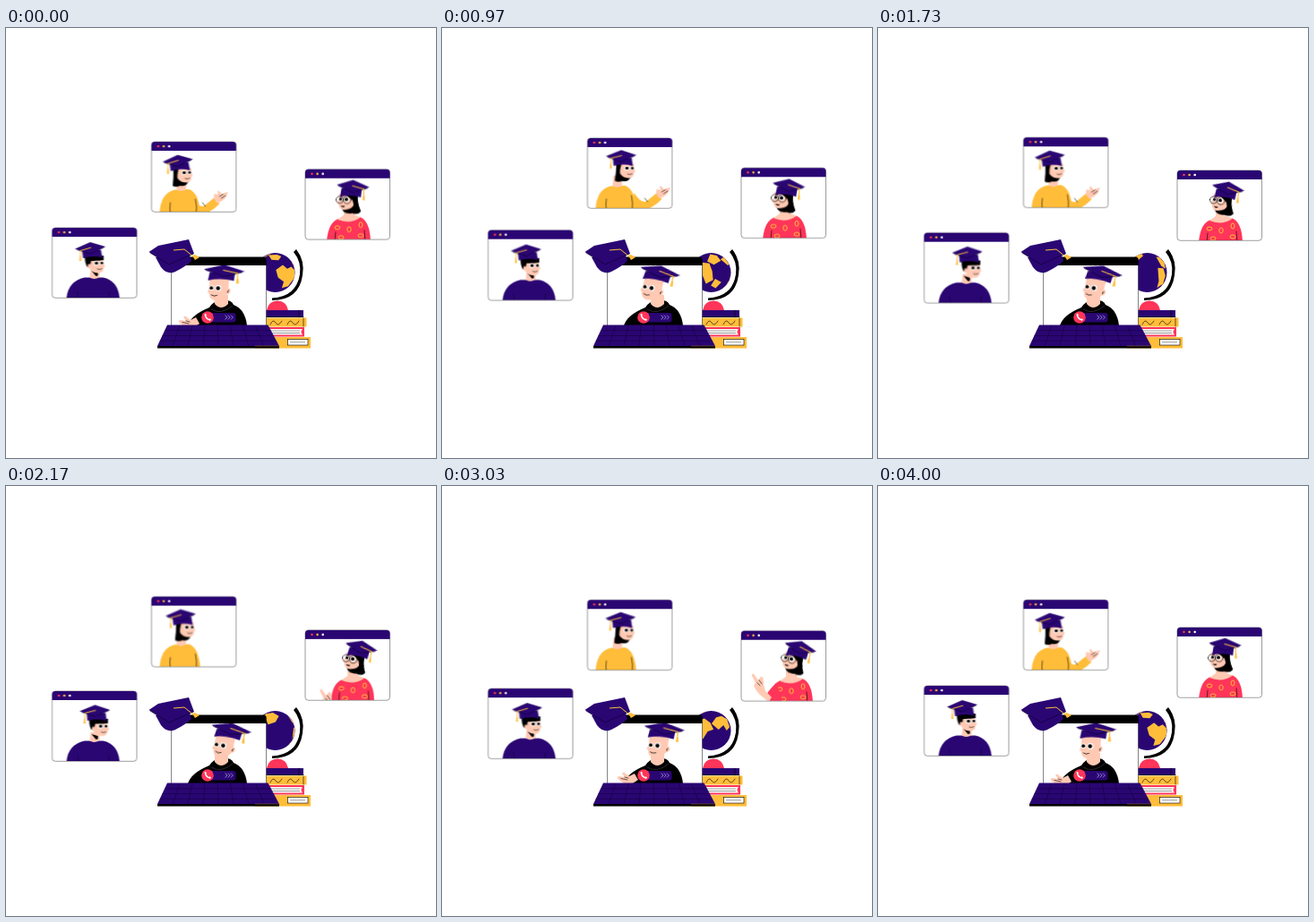
Recreate the animation shown at these times as an HTML page. Size 480 px wide and 480 px high, loop 4.03 s.

```html
<!DOCTYPE html>
<html lang="en">
<head>
<meta charset="utf-8">
<title>Online graduation</title>
<style>
html, body { margin: 0; width: 100%; height: 100%; overflow: hidden; background: #fff; }
svg { display: block; width: 100vw; height: 100vh; }
.navy { fill: #2a0673; }
.gold { fill: #ffbd3a; }
.red { fill: #ff3559; }
.skin { fill: #ffc9b3; }
.white { fill: #fff; }
.line { fill: none; stroke: #000; stroke-width: .6; stroke-linecap: round; stroke-linejoin: round; }
.edge { fill: none; stroke: #000; stroke-width: .4; }
.trim { fill: none; stroke: #ffbd3a; stroke-width: 1; stroke-linejoin: round; }

.bob { animation: bob 2.015s cubic-bezier(.37, 0, .63, 1) infinite alternate; }
.b1 { animation-delay: -2.545s; }
.b2 { animation-delay: -3.995s; }
.b3 { animation-delay: -3.295s; }
@keyframes bob { from { transform: translateY(-3px); } to { transform: translateY(3px); } }

.move { animation: 4.03s ease-in-out infinite; }
.h1 { animation-name: headTop; }
.h2 { animation-name: headLeft; }
.h3 { animation-name: headRight; }
.h4 { animation-name: headMain; }
.a1 { animation-name: armTop; }
.a3 { animation-name: armRight; }
.a4 { animation-name: armMain; }
.t3 { animation-name: torsoRight; }
.open { animation-name: eyesOpen; animation-timing-function: step-end; }
.shut { animation-name: eyesShut; animation-timing-function: step-end; }

@keyframes headTop {
  0%, 100%, 42%, 46% { transform: translate(0, 0) rotate(-1deg); }
  13%, 25%, 64%, 71% { transform: translate(7.5px, -1px) rotate(2deg); }
  84% { transform: translate(4.5px, 0) rotate(1deg); }
}
@keyframes headLeft {
  0%, 100% { transform: translate(0, 0); }
  14%, 24% { transform: translate(-.5px, 0) rotate(1deg); }
  43%, 50% { transform: translate(5px, -.5px) rotate(2deg); }
  65% { transform: translate(2.5px, 0) rotate(1deg); }
  84% { transform: translate(-.5px, 0); }
}
@keyframes headRight {
  0%, 100% { transform: translate(0, 0); }
  14% { transform: translate(-4px, 0) rotate(-1deg); }
  24% { transform: translate(-1px, 0) rotate(3deg); }
  43% { transform: translate(2px, 0) rotate(6deg); }
  62%, 84% { transform: translate(10px, -2px) rotate(11deg); }
}
@keyframes headMain {
  0%, 100%, 83% { transform: translate(0, 0); }
  14% { transform: translate(-3px, 0) rotate(6deg); }
  24% { transform: translate(-3px, 0) rotate(9deg); }
  43% { transform: translate(4px, 0) rotate(9deg); }
  64%, 68% { transform: translate(7px, -1px) rotate(6deg); }
}
@keyframes armTop {
  0%, 100%, 42%, 46% { transform: translate(0, 0); }
  13%, 25% { transform: translate(7px, -1px); }
  57%, 86% { transform: translate(-14px, 32px); }
}
@keyframes armRight {
  0%, 100%, 47%, 95% { transform: translate(10px, 40px); }
  60%, 86% { transform: translate(0, 0); }
}
@keyframes armMain {
  0%, 100%, 81% { transform: translate(0, 0); }
  10%, 50% { transform: translate(10px, 24px); }
  62%, 68% { transform: translate(7px, -5px); }
}
@keyframes torsoRight {
  0%, 100%, 43% { transform: translate(0, 0); }
  62%, 84% { transform: translate(7px, 0); }
}
@keyframes eyesOpen { 0%, 19%, 100% { opacity: 1; } 10% { opacity: 0; } }
@keyframes eyesShut { 0%, 19%, 100% { opacity: 0; } 10% { opacity: 1; } }
</style>
</head>
<body>
<svg viewBox="0 0 480 480">
  <defs>
    <clipPath id="pane"><rect x=".3" y="10" width="94" height="68" rx="2.5"/></clipPath>
    <clipPath id="screen"><rect x="185" y="265" width="105" height="67"/></clipPath>

    <rect id="frame" class="white" width="94.5" height="78.3" rx="3.5"/>
    <g id="bar">
      <rect class="edge" width="94.5" height="78.3" rx="3.5"/>
      <path class="navy" d="M0 10V3.5Q0 0 3.5 0H91Q94.5 0 94.5 3.5V10Z"/>
      <circle class="red" cx="7.5" cy="5" r="1.3"/>
      <circle class="gold" cx="13.6" cy="5" r="1.3"/>
      <circle class="white" cx="19.7" cy="5" r="1.3"/>
    </g>

    <g id="cap">
      <path class="navy" d="M-15 -11L-14 -2.5Q-3 -6 7.5 -3L6 -12Z"/>
      <path class="navy" d="M-23 -13L-6 -20.5L11 -15.5L-6 -7.5Z"/>
      <path d="M-21 -12L-6 -7.5L9.5 -14.6" fill="none" stroke="#12003c" stroke-width=".7"/>
      <path class="trim" d="M-5 -14.5L-17 -11V-4"/>
      <path class="gold" d="M-17.7 -5H-16.3L-15.8 .5H-18.2Z"/>
    </g>

    <path id="skull" class="skin" d="M-8 -6L8.5 -6Q9 -2 9.2 0L10.5 3L9 4.2Q9 9.5 4 10.5Q-4 10.5 -7 5Q-10.5 4.5 -10 1Q-9 -1 -8 0Z"/>
    <g id="eyes">
      <circle class="white" cx=".8" cy="-.5" r="2.7"/>
      <circle class="white" cx="6.8" cy="-.7" r="2.2"/>
      <circle cx="1" cy="-.5" r="1.8"/>
      <circle cx="7" cy="-.7" r="1.5"/>
    </g>
    <path id="smile" class="line" d="M2 6Q4.5 7.5 7 5.6"/>
  </defs>

  <!-- top window -->
  <g transform="translate(162.4 125)"><g class="bob b1">
    <use href="#frame"/>
    <g clip-path="url(#pane)">
      <g class="move a1">
        <path class="gold" d="M45 62Q52 73 58 72L70 62.5L76 69Q66 80 52 82L42 80Z"/>
        <path class="skin" d="M69.5 63L73 68.5Q81 66 83.5 61L85.5 56L81 57L79 58.5L75 54.5L73.5 55.5L74.5 59L70 58Z"/>
        <path class="line" d="M76 61L80 58.5M78 63L82.5 60M60 72L57 68"/>
      </g>
      <path class="gold" d="M9 80Q10 57 26 53.5L42 53Q53 57 54.5 80Z"/>
      <path class="line" d="M21 68Q20 74 21 80M49 64Q51 72 50 80"/>
      <path class="skin" d="M29 42H39L38.5 53Q33 57 28 53Z"/>
      <g transform="translate(35.5 35)"><g class="move h1">
        <path d="M-10 -6Q-11 7 -12 14Q-8 16 -4 14Q0 15 3 13L6 9L-3 4V-6Z"/>
        <use href="#skull"/>
        <path d="M-11 -6Q-11 8 -12 14Q-8 15 -6.5 11Q-7 6 -6.5 1L-5 -6Z"/>
        <use href="#eyes"/><use href="#smile"/><use href="#cap"/>
      </g></g>
    </g>
    <use href="#bar"/>
  </g></g>

  <!-- left window -->
  <g transform="translate(51.5 226)"><g class="bob b2">
    <use href="#frame"/>
    <g clip-path="url(#pane)">
      <path class="navy" d="M16 80Q17 60 36 55.500H57Q74 59 75.500 80Z"/>
      <path d="M28 71L30 80M64 71L63 80" fill="none" stroke="#12003c" stroke-width=".6"/>
      <path class="skin" d="M43 46H53V55Q47 58.500 42 55.500Z"/>
      <path d="M44 48L51 50Q52 54 49 54Z"/>
      <g transform="translate(48.500 40)"><g class="move h2">
        <use href="#skull"/>
        <path d="M-12 -8Q-12 0 -9 4L-8 0L-6 1L-5 -3Q3 -3 9 -4L9 -9Z"/>
        <use href="#eyes"/><use href="#smile"/>
        <use href="#cap" transform="translate(0 -3.500)"/>
      </g></g>
    </g>
    <use href="#bar"/>
  </g></g>

  <!-- right window -->
  <g transform="translate(334 159)"><g class="bob b3">
    <use href="#frame"/>
    <g clip-path="url(#pane)">
      <g class="move t3">
        <path class="red" d="M24 80Q26 58 38 55L60 53Q72 56 73 80Z"/>
        <path class="skin" d="M36 56L43 51V43H55V51L62 53.5Q50 62 36 56Z"/>
        <g class="trim">
          <ellipse cx="36" cy="65" rx="3" ry="2"/>
          <ellipse cx="49" cy="67" rx="2.2" ry="3"/>
          <ellipse cx="62" cy="62" rx="2" ry="3"/>
          <ellipse cx="62" cy="74" rx="3" ry="2"/>
          <ellipse cx="40" cy="76" rx="3" ry="2"/>
        </g>
        <path class="line" d="M34 70L33 80M66 68L67 80"/>
      </g>
      <g class="move a3">
        <path class="red" d="M39 58Q31 66 29 70L36 79L46 78Z"/>
        <path class="skin" d="M27 67L34 74L31 79Q17 70 14 61L16 58L11.500 49L13.500 47.500L19 55L22 51L24.500 52L25 60Z"/>
        <path class="line" d="M18 58L21 61M20 55L23 59"/>
      </g>
      <g transform="translate(47 34)"><g class="move h3"><g transform="scale(-1.08 1.08)">
        <path d="M-10 -6Q-10 3 -14 12Q-11 16 -5 14Q1 15 4 12L6 9L-2 4V-6Z"/>
        <use href="#skull"/>
        <path d="M-11 -6Q-10 4 -14 12Q-9 14 -6.500 10Q-7 4 -5 0Q0 -3 2 -6Z"/>
        <use href="#eyes"/>
        <g class="line">
          <circle cx=".3" cy="0" r="4"/><circle cx="8" cy="0" r="3.7"/><path d="M-4 0L-8 -1"/>
        </g>
        <path d="M2 6.500Q5 9 7 6Z"/>
        <use href="#cap"/>
      </g></g></g>
    </g>
    <use href="#bar"/>
  </g></g>

  <!-- globe and books -->
  <circle class="navy" cx="300.5" cy="273" r="22"/>
  <path id="land" class="gold" transform="translate(300.5 273) rotate(15)"/>
  <path d="M321 250L324 247Q334 260 331 276Q327 304 297 304V301.500Q324 300 328 275Q330 261 321 250Z"/>
  <path class="red" d="M291 315Q293 304.5 303 304.5T315 315Z"/>
  <rect class="navy" x="285" y="315" width="47" height="8"/>
  <path d="M286 322.5H332M327 315V323" class="line"/>
  <rect class="gold" x="285" y="323.5" width="50.5" height="10"/>
  <path class="line" d="M295 331Q298 324 301 329T308 327M314 331Q317 324 320 329T327 327M332 324V333"/>
  <path class="red" d="M285 334H333V344.5H285Z"/>
  <path class="white" d="M285 336H331Q328 339 331 342.5H285Z"/>
  <path class="edge" d="M290 338H328M290 340.5H328"/>
  <rect class="gold" x="278" y="345" width="62" height="12.5"/>
  <rect class="white" x="314.5" y="347.5" width="22.5" height="6.5" stroke="#000" stroke-width=".6"/>
  <path class="edge" d="M317 350.7H334"/>

  <!-- laptop -->
  <path d="M184.200 332V259Q184.200 255.500 187.500 255.500H287.500Q290.700 255.500 290.700 259V332Z"/>
  <rect class="white" x="184.600" y="265" width="105.700" height="67"/>
  <g clip-path="url(#screen)">
    <path d="M203 332Q207 320 227 312Q231 305 240 304Q252 303 254 309Q267 314 269 332Z"/>
    <path class="skin" d="M233 298H248V308Q240 316 233 308Z"/>
    <path class="line" d="M229 314Q240 321 253 310" style="stroke:#4b4456"/>
    <g class="move a4">
      <path d="M207 333L213 322L226 316L225 334Z"/>
      <path class="skin" d="M193 328.5Q192 326 195 326L201 327L198 322.5L200 321.5L206 326L212 323L216 330L210 334H200Z"/>
      <path class="line" d="M197 328.5L204 330M201 327L205 328"/>
    </g>
    <g transform="translate(238 291)"><g class="move h4"><g transform="scale(-1.25 1.25)">
      <path class="skin" d="M-9 -10H8.500V-5L-8 1Z"/>
      <use href="#skull"/>
      <path class="line" d="M-8.500 1.500Q-7 1.500 -7.500 3.500"/>
      <g class="move open"><use href="#eyes"/><use href="#smile"/></g>
      <g class="move shut">
        <path class="line" d="M-1 -.5Q1 -2.5 3 -.5M5.5 -.8Q7 -2.5 8.5 -.8"/>
        <path d="M0 4.5L7.500 4Q6 9 2.500 8Z"/>
        <path class="white" d="M1 4.8L6.800 4.500L6 6L2 6.200Z"/>
      </g>
      <use href="#cap" transform="translate(2 -5) scale(1.080 .8)"/>
    </g></g></g>
  </g>
  <rect class="navy" x="219" y="318" width="37.5" height="10.5" rx="3"/>
  <circle class="red" cx="225" cy="323" r="6.8"/>
  <path d="M222.5 320.3Q223 324.5 227.6 325.9" fill="none" stroke="#fff" stroke-width="1.5"/>
  <path d="M221.8 320.5L223.4 319.6M226.8 326.3L228.4 325" stroke="#fff" stroke-width="2"/>
  <path d="M244.5 320.5L247 323L244.5 325.5M247.7 320.5L250.2 323L247.7 325.5M250.9 320.5L253.4 323L250.9 325.5" fill="none" stroke="#9a86d8" stroke-width=".9"/>

  <path d="M169 355H305V357.500H169Z"/>
  <path class="navy" d="M180 331.600H292.500L305 355H169Z"/>
  <path id="keys" fill="none" stroke="#16003f" stroke-width=".6"/>
  <path d="M278 355H305" stroke="#7a5a20" stroke-width=".7"/>

  <!-- resting cap -->
  <path class="navy" d="M167 256L173 267Q180 276 189 272Q201 266 207 260L204 250Z"/>
  <path class="navy" d="M159.500 250L170 243L204 236L210 252L182 264Z"/>
  <path d="M161 251L182 264L209 252" fill="none" stroke="#12003c" stroke-width=".8"/>
  <path class="trim" d="M187 248L199 247L210 256"/>
  <path class="gold" d="M208 254L211 253L216 256L211 259Z"/>
</svg>
<script>
const LOOP = 4030, R = 22, RAD = Math.PI / 180;

// Rough coastlines as longitude, latitude pairs.
const lands = [
  "0 8 18 28 35 20 55 30 80 22 95 5 80 -5 70 -30 45 -42 35 -20 12 -12",
  "85 20 95 45 125 58 165 50 160 25 140 12 125 25 110 8",
  "-60 50 -20 65 10 60 0 40 -25 35",
  "-125 62 -80 65 -60 45 -85 25 -110 30",
  "-125 22 -100 25 -85 5 -75 -20 -95 -38 -110 -15",
  "-70 -15 -45 -20 -50 -45 -75 -40"
].map(s => s.match(/-?\d+ -?\d+/g).map(p => p.split(" ").map(Number)));

const wrap = a => ((a + 540) % 360 + 360) % 360 - 180;

// Orthographic outline; points behind the globe slide onto its rim.
function outline(points, turn) {
  const mid = points.reduce((s, p) => s + p[0], 0) / points.length;
  const shift = wrap(mid + turn) - mid;
  const seen = points.map(([lon, lat]) => [lon + shift, lat]);
  if (seen.every(([lon]) => Math.abs(lon) >= 90)) return "";
  return "M" + seen.map(([lon, lat]) => {
    const a = Math.max(-90, Math.min(90, lon)) * RAD, b = lat * RAD;
    return (R * Math.cos(b) * Math.sin(a)).toFixed(2) + " " + (-R * Math.sin(b)).toFixed(2);
  }).join("L") + "Z";
}

let keys = "";
for (let i = 1; i < 8; i++) keys += `M${180 + 14.06 * i} 332L${169 + 17 * i} 355`;
for (let i = 1; i < 4; i++) {
  const k = i / 4;
  keys += `M${180 - 11 * k} ${332 + 23 * k}H${292.5 + 12.5 * k}`;
}
document.getElementById("keys").setAttribute("d", keys);

const land = document.getElementById("land");
function draw() {
  const turn = document.timeline.currentTime % LOOP / LOOP * 360;
  land.setAttribute("d", lands.map(p => outline(p, turn)).join(""));
  requestAnimationFrame(draw);
}
draw();
</script>
</body>
</html>
```
